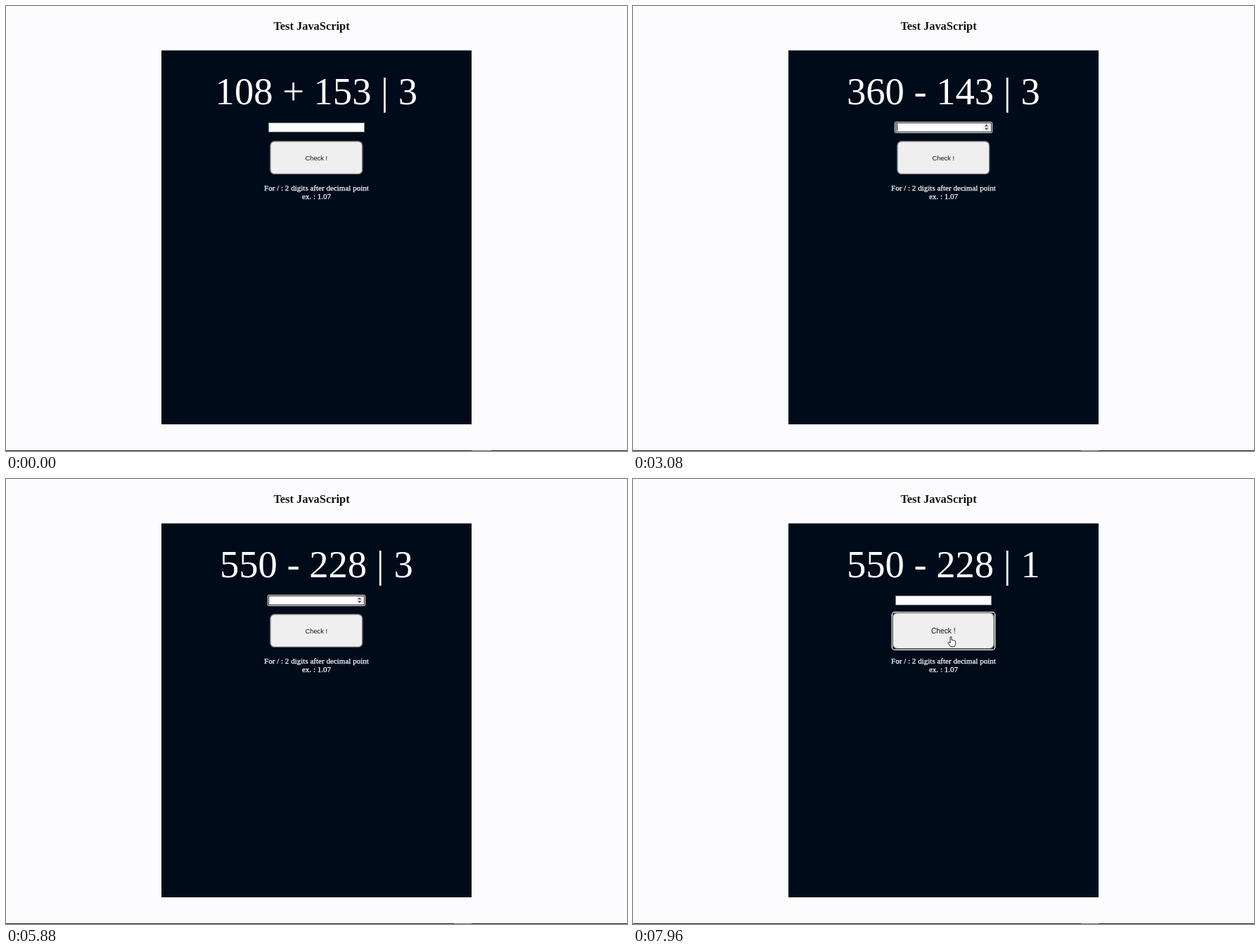
These frames come from a looping animation (883 px wide and 634 px high, 8000 ms). An HTML page:

```html
<!DOCTYPE html>
<html lang="en">
<head>
<meta charset="utf-8">
<title>Arithmetic test</title>
<style>
  html, body { margin: 0; width: 100%; height: 100%; overflow: hidden; background: #fcfcfe; }
  svg { display: block; width: 883px; height: 634px; }
  text { text-anchor: middle; white-space: pre; }
  .serif { font-family: "Liberation Serif", "Times New Roman", serif; fill: #fff; }
  .sans { font-family: "Liberation Sans", Arial, sans-serif; }
  .hint { stroke: #fff; stroke-width: .25; }
</style>
</head>
<body>
<svg viewBox="0 0 883 634">
  <rect width="883" height="634" fill="#fcfcfe"/>
  <text class="serif" x="434.5" y="34" font-size="16.4" font-weight="bold" style="fill:#111">Test JavaScript</text>
  <rect x="221" y="63.3" width="441" height="532.7" fill="#000b1a"/>
  <text id="equation" class="serif" x="441.3" y="140" font-size="54.6"></text>

  <rect x="373.5" y="166.5" width="136" height="13" fill="#fff" stroke="#777"/>
  <g id="inputFocus">
    <rect x="372" y="165" width="139" height="16" rx="2" fill="#fff"/>
    <rect x="373.5" y="166.5" width="136" height="13" fill="#fff" stroke="#101010"/>
    <rect x="498" y="167.2" width="10" height="11" fill="#efefef"/>
    <path d="M500 171.5l2.7-3 2.7 3zM500 173.7l2.7 3 2.7-3z" fill="#505050"/>
    <path id="caret" d="M375.5 167.5v10.5" stroke="#000"/>
  </g>

  <rect id="buttonRing" x="368.2" y="189.7" width="146.6" height="53.6" rx="4" fill="#000" stroke="#fff" stroke-width="1.3"/>
  <g id="button">
    <rect x="375.8" y="192.8" width="131" height="46.6" rx="6" fill="#efefef" stroke="#686868" stroke-width="1.4"/>
    <text class="sans" x="441.3" y="220" font-size="9.3" fill="#111">Check !</text>
  </g>

  <g class="serif hint" font-size="11.06">
    <text x="441.5" y="263">For / : 2 digits after decimal point</text>
    <text x="441.5" y="275.3">ex. : 1.07</text>
  </g>

  <rect y="633" width="883" height="1" fill="#202020"/>
  <rect id="barGap" y="633" height="1" fill="#707070"/>

  <g id="cursor" fill="#fff" stroke="#111" stroke-width=".9" stroke-linejoin="round">
    <path id="arrow" d="M.4 .4V11.2L2.9 8.9 4.6 12.6 6.3 11.8 4.7 8.2H8z"/>
    <path id="hand" d="M0 1.2Q1-.2 2 1.2V5.4Q3.3 4.7 4 6Q5.3 5.3 6 6.6Q7.5 6.1 7.6 7.6V10.6Q7.4 13 6.2 14.8H.4Q-1.2 12-3 9.6Q-3.2 8-1.7 8.4L0 9.8z"/>
  </g>
</svg>
<script>
const LOOP = 8000;
const $ = id => document.getElementById(id);
const show = (id, on) => $(id).setAttribute("display", on ? "inline" : "none");
const set = (id, attrs) => Object.entries(attrs).forEach(([k, v]) => $(id).setAttribute(k, v));
const clamp = v => Math.min(1, Math.max(0, v));

// Steps are [start time, value]; the latest one reached applies.
const equations = [
  [0, "108 + 153"], [2130, "274 + 316"], [3080, "360 - 143"], [4080, "247 + 318"],
  [4540, "569 - 429"], [5380, "415 + 162"], [5590, "550 - 228"]
];
const tries = [[0, 3], [7500, 2], [7960, 1]];
const caretStates = [
  [0, false], [2130, true], [2670, false], [3080, true], [3670, false],
  [4080, true], [5210, false], [5380, true], [5880, false], [6380, true]
];
const stepAt = (steps, t) => steps.filter(s => s[0] <= t).pop()[1];

// Pointer trips as [time, x, y] waypoints.
const trips = [
  [[130, 688, 262], [330, 590, 150], [560, 390, 45], [720, 235, 24], [920, 98, 58], [1210, -8, -14]],
  [[6130, 47, 32], [6350, 50, 56], [6500, 54, 70], [6580, 55, 71], [6920, 576, 243],
   [7010, 653, 262], [7190, 440.5, 216], [7460, 440.5, 216], [7700, 451, 224], [LOOP, 451, 224]]
];

function pointerAt(t) {
  const trip = trips.find(p => t >= p[0][0] && t < p[p.length - 1][0]);
  if (!trip) return null;
  const i = trip.findIndex(p => p[0] > t);
  const [a, b] = [trip[i - 1], trip[i]];
  const k = (t - a[0]) / (b[0] - a[0]);
  return { x: a[1] + (b[1] - a[1]) * k, y: a[2] + (b[2] - a[2]) * k };
}

function draw(t) {
  const clicked = t >= 7500;
  const pointer = pointerAt(t);
  const hover = clamp((t - 7130) / 60);
  const scale = 1 + 0.1 * hover;

  $("equation").textContent = `${stepAt(equations, t)} | ${stepAt(tries, t)}`;
  show("inputFocus", t >= 2130 && !clicked);
  show("caret", stepAt(caretStates, t));
  show("buttonRing", clicked);
  set("button", { transform: `translate(441.3 216.2) scale(${scale}) translate(-441.3 -216.2)` });
  set("barGap", t < 1710 ? { x: 662, width: 28 } : { x: 637, width: 25 });

  show("cursor", pointer);
  show("arrow", !hover);
  show("hand", hover);
  if (pointer) set("cursor", { transform: `translate(${pointer.x} ${pointer.y})` });
}

const start = performance.now();
function tick() {
  draw((performance.now() - start) % LOOP);
  requestAnimationFrame(tick);
}
tick();
</script>
</body>
</html>
```
